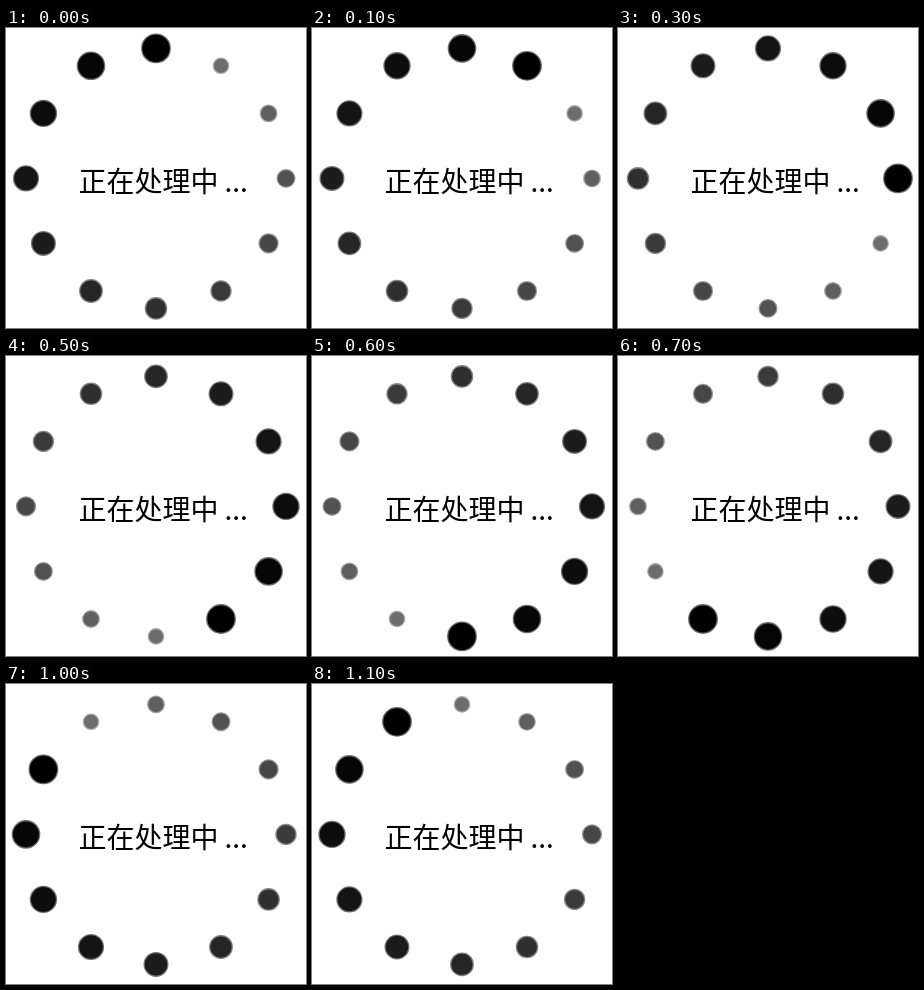
Animation, 300 px wide and 300 px high, one loop 1200 ms. Source, as an HTML page:

```html
<!DOCTYPE html>
<html lang="zh-CN">
<head>
<meta charset="utf-8">
<title>正在处理中</title>
<style>
  html, body { margin: 0; width: 100%; height: 100%; overflow: hidden; background: #fff; }
  svg { display: block; width: 100%; height: 100%; }
  text { font: 28px "Noto Sans CJK SC", "Noto Sans CJK", "Noto Sans CJK JP", sans-serif; }
</style>
</head>
<body>
<svg viewBox="0 0 300 300">
  <g id="dots" stroke-width="2.6" stroke-opacity="0.6"></g>
  <text y="164"><tspan x="72.5">正在处理中</tspan><tspan x="218.5">...</tspan></text>
</svg>
<script>
const COUNT = 12, STEP_MS = 100, CENTER = 150, ORBIT = 130;
const group = document.getElementById('dots');

const dots = Array.from({ length: COUNT }, (_, i) => {
  const dot = document.createElementNS('http://www.w3.org/2000/svg', 'circle');
  const angle = i / COUNT * 2 * Math.PI;
  dot.setAttribute('cx', CENTER + ORBIT * Math.sin(angle));
  dot.setAttribute('cy', CENTER + 0.4 - ORBIT * Math.cos(angle));
  return group.appendChild(dot);
});

// Dots shrink and fade with the number of steps since the head passed them.
function render(ms) {
  const head = Math.floor(ms / STEP_MS) % COUNT;
  dots.forEach((dot, i) => {
    const age = (head - i + COUNT) % COUNT;
    const shade = Math.round(5.5 * age + 0.4 * age * age);
    const color = `rgb(${shade},${shade},${shade})`;
    dot.setAttribute('r', 13.6 - 0.6 * age);
    dot.setAttribute('fill', color);
    dot.setAttribute('stroke', color);
  });
}

const start = performance.now();
function tick() {
  render(performance.now() - start);
  requestAnimationFrame(tick);
}
tick();
</script>
</body>
</html>
```
